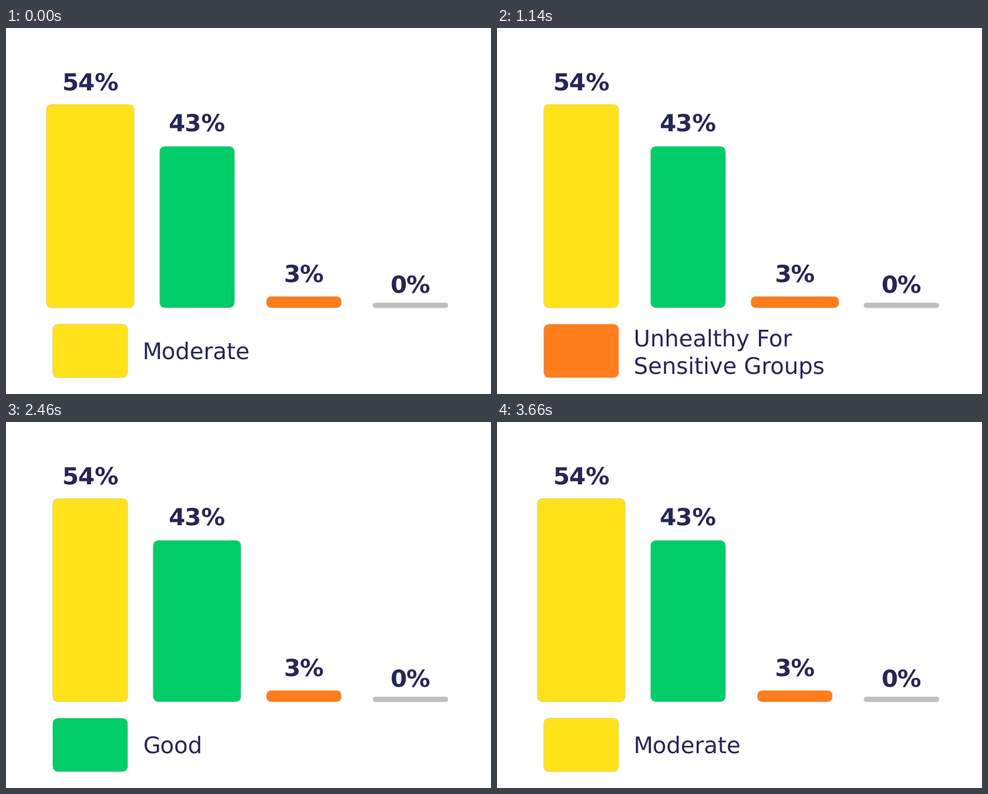
A matplotlib script for the animation above (3.84 s loop, 724x546 px).

```python
import matplotlib.pyplot as plt
from matplotlib.animation import FuncAnimation
from matplotlib.patches import Circle, FancyBboxPatch

W, H, DPI = 724, 546, 100
FRAMES, STEP = 64, 60

INK = "#262657"
YELLOW, GREEN, ORANGE, GREY = "#ffe21a", "#00cd68", "#ff7d1a", "#bfbfbf"
BAR_W, GROW, BASE = 112, 10, 417.5

plt.rcParams["text.hinting"] = "none"
plt.rcParams["font.family"] = "DejaVu Sans"

# value, label baseline, center x, top, corner radius, color, category, grows when selected
BARS = [
    ("54%", 93.5, 125.8, 114, 9, YELLOW, "Moderate", True),
    ("43%", 154.5, 285.2, 176.5, 9, GREEN, "Good", True),
    ("3%", 379.5, 444.7, 400.5, 8, ORANGE, "Unhealthy For\nSensitive Groups", True),
    ("0%", 395, 603.8, 410, 3.9, GREY, "Others", False),
]

# first frame of a press, frame of the release, bar chosen on release, press position
PRESSES = [
    (8, 10, 1, (285, 296)),
    (18, 19, 2, (445, 408)),
    (24, 26, 3, (619, 414)),
    (30, 32, 0, (85.5, 296)),
    (39, 41, 1, (285, 296)),
    (48, 50, 0, (145, 296)),
]

fig = plt.figure(figsize=(W / DPI, H / DPI), dpi=DPI, facecolor="white")
ax = fig.add_axes([0, 0, 1, 1])
ax.set_xlim(0, W)
ax.set_ylim(H, 0)
ax.axis("off")


def px(size):
    """Convert pixels to points."""
    return size * 72 / DPI


def rounded(x, y, w, h, radius, color):
    style = f"round,pad=0,rounding_size={radius}"
    box = FancyBboxPatch((x, y), w, h, boxstyle=style, facecolor=color,
                         edgecolor="#c8c8c8", linewidth=px(0.5))
    return ax.add_patch(box)


def write(x, y, text, size, **kw):
    return ax.text(x, y, text, fontsize=px(size), color=INK, va="baseline", **kw)


boxes = []
for value, label_y, cx, top, radius, color, _, _ in BARS:
    boxes.append(rounded(cx - BAR_W / 2, top, BAR_W, BASE - top, radius, color))
    write(cx, label_y, value, 35.5, ha="center", weight="bold")

swatch = rounded(69.8, 441.8, BAR_W, 80, 9, YELLOW)
legend = [write(204, 0, "", 33.8) for _ in range(2)]
touch = ax.add_patch(Circle((0, 0), 48, facecolor=(0.78, 0.78, 0.78, 0.83),
                            edgecolor="#9696b8", linewidth=px(1.5), zorder=10))


def update(frame):
    selected = 0
    touch.set_visible(False)
    for start, release, bar, pos in PRESSES:
        if start <= frame < release:
            touch.set_center(pos)
            touch.set_visible(True)
        if frame >= release:
            selected = bar

    for i, (box, bar) in enumerate(zip(boxes, BARS)):
        cx, top, grows = bar[2], bar[3], bar[7]
        width = BAR_W + 2 * GROW * (grows and i == selected) * 0.97
        box.set_bounds(cx - width / 2, top, width, BASE - top)

    swatch.set_facecolor(BARS[selected][5])
    lines = BARS[selected][6].split("\n")
    first = 495 if len(lines) == 1 else 475
    for i, text in enumerate(legend):
        text.set_text(lines[i] if i < len(lines) else "")
        text.set_y(first + 41 * i)
    return [*boxes, swatch, *legend, touch]


anim = FuncAnimation(fig, update, frames=FRAMES, interval=STEP,
                     repeat=True, repeat_delay=0, blit=False)
plt.show()
```
